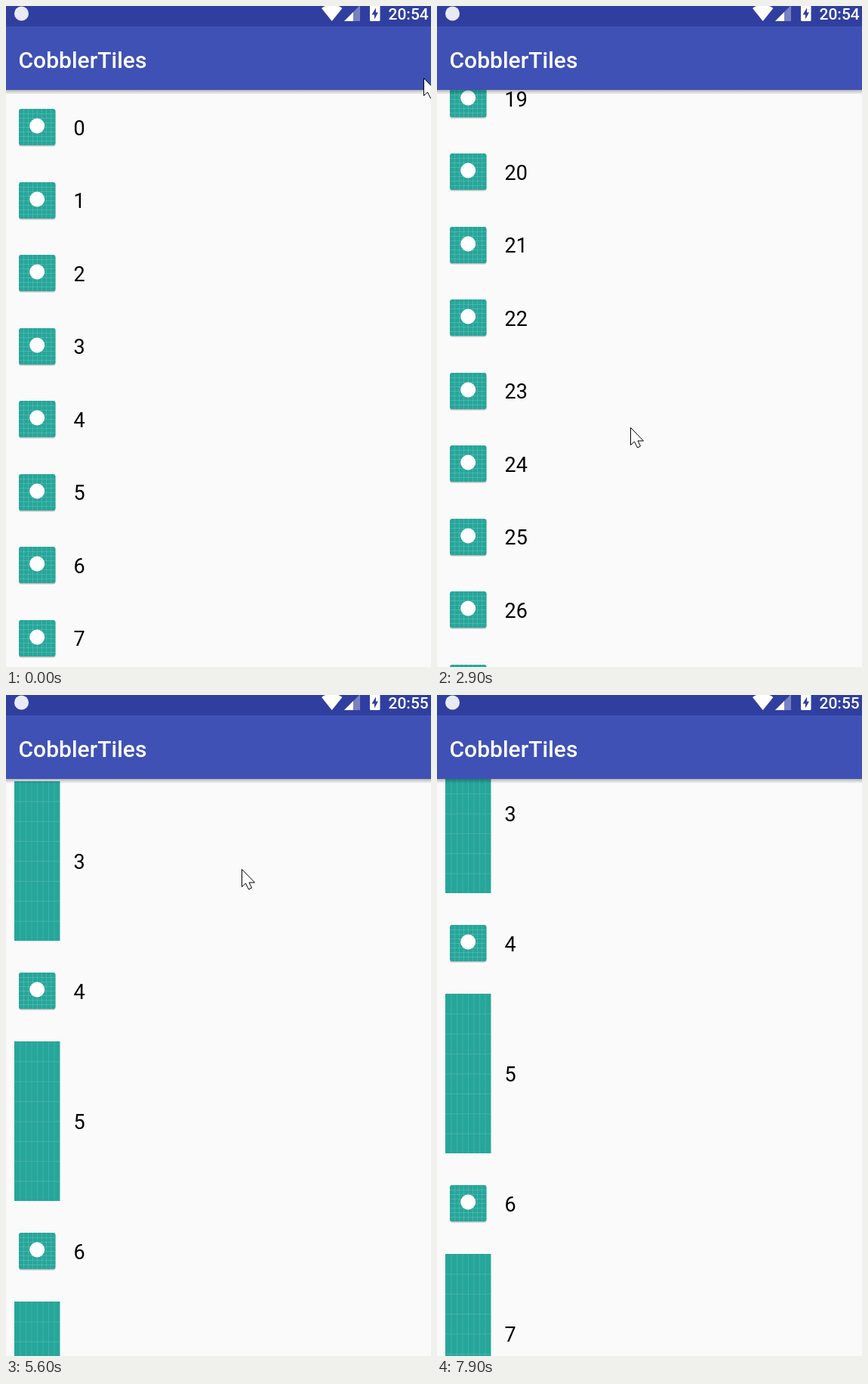
Recreate the animation shown at these times as an HTML page with a canvas. Size 563 by 874 pixels, loop 8000 ms.

```html
<!DOCTYPE html>
<html lang="en">
<head>
<meta charset="utf-8">
<title>Scrolling list</title>
<style>
html, body { margin: 0; width: 100%; height: 100%; overflow: hidden; background: #fafafa; }
canvas { display: block; width: 563px; height: 874px; }
</style>
</head>
<body>
<canvas id="stage" width="563" height="874"></canvas>
<script>
const W = 563, H = 874, BAR = 111, LOOP = 8000, STEP = 100, SWITCH = 4500;
const TEAL = '#26a69a';
const ctx = document.getElementById('stage').getContext('2d');

// Each fling slows down until it has covered its distance
const evenFlings = [
  { at: 600, lasts: 1300, by: 686.5 },
  { at: 2000, lasts: 900, by: 1184.5 },
  { at: 2900, lasts: 1300, by: 1973 }
];
const mixedFlings = [
  { at: 5300, lasts: 1000, by: 931.4 },
  { at: 6300, lasts: 500, by: 1818.6 },
  { at: 6800, lasts: 1100, by: -2211.5 }
];

// Turning points of the pointer: time, x, y
const path = [
  [0, 553, 95], [550, 365, 690], [1000, 315, 180], [1900, 308, 690], [2000, 305, 664],
  [2300, 300, 75], [2800, 262, 650], [2900, 256, 557], [3200, 290, 16], [4100, 700, 360],
  [5250, 340, 705], [5600, 312, 230], [5800, 328, 0], [6250, 302, 560], [6500, 288, 86],
  [6800, 265, 310], [7400, 386, 900]
];

function scrolled(flings, t) {
  return flings.reduce((sum, f) => {
    const left = 1 - Math.min(1, Math.max(0, (t - f.at) / f.lasts));
    return sum + f.by * (1 - left * left);
  }, 0);
}

// Monotone cubic through the path, without overshoot
function along(t, k) {
  const last = path.length - 1;
  if (t >= path[last][0]) return path[last][k];
  const i = path.findIndex((p, n) => t < path[n + 1][0]);
  const slope = n => n < 0 || n >= last ? 0
    : (path[n + 1][k] - path[n][k]) / (path[n + 1][0] - path[n][0]);
  const tangent = n => {
    const a = slope(n - 1), b = slope(n);
    return a * b <= 0 ? 0 : 2 * a * b / (a + b);
  };
  const span = path[i + 1][0] - path[i][0];
  const u = (t - path[i][0]) / span, v = 1 - u;
  return v * v * (1 + 2 * u) * path[i][k] + u * u * (3 - 2 * u) * path[i + 1][k]
    + span * u * v * (v * tangent(i) - u * tangent(i + 1));
}

function rect(x, y, w, h, color) {
  ctx.fillStyle = color;
  ctx.fillRect(x, y, w, h);
}

function round(x, y, w, h, r, color) {
  ctx.fillStyle = color;
  ctx.beginPath();
  ctx.roundRect(x, y, w, h, r);
  ctx.fill();
}

function disc(x, y, r, color) {
  ctx.fillStyle = color;
  ctx.beginPath();
  ctx.arc(x, y, r, 0, Math.PI * 2);
  ctx.fill();
}

function shape(points, color) {
  ctx.fillStyle = color;
  ctx.beginPath();
  points.forEach(([x, y]) => ctx.lineTo(x, y));
  ctx.closePath();
  ctx.fill();
}

function text(str, x, y, size, weight, color) {
  ctx.font = `${weight} ${size}px Roboto, sans-serif`;
  ctx.fillStyle = color;
  ctx.fillText(str, x, y);
}

// Faint lines that split a box into eight columns and rows
function grid(x, y, w, h, alpha) {
  const color = `rgba(255,255,255,${alpha})`;
  for (let n = 1; n < 8; n++) {
    rect(x + w * n / 8, y, 1, h, color);
    rect(x, y + h * n / 8, w, 1, color);
  }
}

function tile(mid) {
  const top = Math.round(mid - 24);
  round(17, top + 1, 48.5, 48.5, 3, 'rgba(0,0,0,.25)');
  round(17, top, 48.5, 48, 3, TEAL);
  grid(17, top, 48, 48, .14);
  disc(41.2, top + 22.5, 10, '#fff');
}

function tallBar(mid) {
  const top = Math.round(mid - 105.5);
  rect(11, top, 60.5, 211, TEAL);
  grid(11, top, 60, 211, .12);
}

function list(pitch, first, scroll, mixed) {
  const start = Math.max(0, Math.floor(scroll / pitch) - 1);
  for (let i = start; i < start + 12; i++) {
    const mid = first + i * pitch - scroll;
    if (mixed && i % 2) tallBar(mid);
    else tile(mid);
    text(i, 89.5, Math.round(mid + 10.5), 27, 400, '#000');
  }
}

function header(clock) {
  const shade = ctx.createLinearGradient(0, BAR, 0, BAR + 6);
  shade.addColorStop(0, 'rgba(0,0,0,.27)');
  shade.addColorStop(1, 'rgba(0,0,0,0)');
  rect(0, BAR, W, 6, shade);
  rect(0, 0, W, BAR, '#3f51b5');
  rect(0, 0, W, 27, '#303f9f');
  text('CobblerTiles', 16.5, 81.5, 30, 500, '#fff');

  disc(20.5, 10, 9.5, '#e8eaf6');
  ctx.fillStyle = '#fff';
  ctx.beginPath();
  ctx.moveTo(431.7, 20);
  ctx.lineTo(418, 3);
  ctx.quadraticCurveTo(431.7, -7, 445.4, 3);
  ctx.fill();
  shape([[448, 20], [469, -1], [469, 20]], 'rgba(255,255,255,.35)');
  shape([[448, 20], [460, 8], [460, 20]], '#fff');
  round(482, -1, 13.5, 21, 1.5, '#fff');
  shape([[490, 2.5], [484.5, 11.5], [488, 11.5], [488, 17.5], [493, 8.5], [490, 8.5]], '#303f9f');
  text(clock, 506.5, 18, 21, 500, '#fff');
}

function cursor(x, y) {
  ctx.save();
  ctx.translate(Math.round(x) + .5, Math.round(y) + .5);
  shape([[0, 0], [0, 23], [5, 18.5], [9, 26.5], [13, 24.5], [9.5, 17.5], [17, 17.5]], '#fff');
  ctx.strokeStyle = '#000';
  ctx.lineWidth = 1;
  ctx.stroke();
  ctx.restore();
}

function draw(t) {
  const mixed = t >= SWITCH;
  rect(0, 0, W, H, '#fafafa');
  if (mixed) list(172, 178.5, scrolled(mixedFlings, t), true);
  else list(96.5, 160, scrolled(evenFlings, t), false);
  header(mixed ? '20:55' : '20:54');
  cursor(along(t, 1), along(t, 2));
}

const begin = performance.now();
function tick() {
  const t = (performance.now() - begin) % LOOP;
  draw(Math.floor(t / STEP) * STEP);
  requestAnimationFrame(tick);
}
tick();
</script>
</body>
</html>
```
